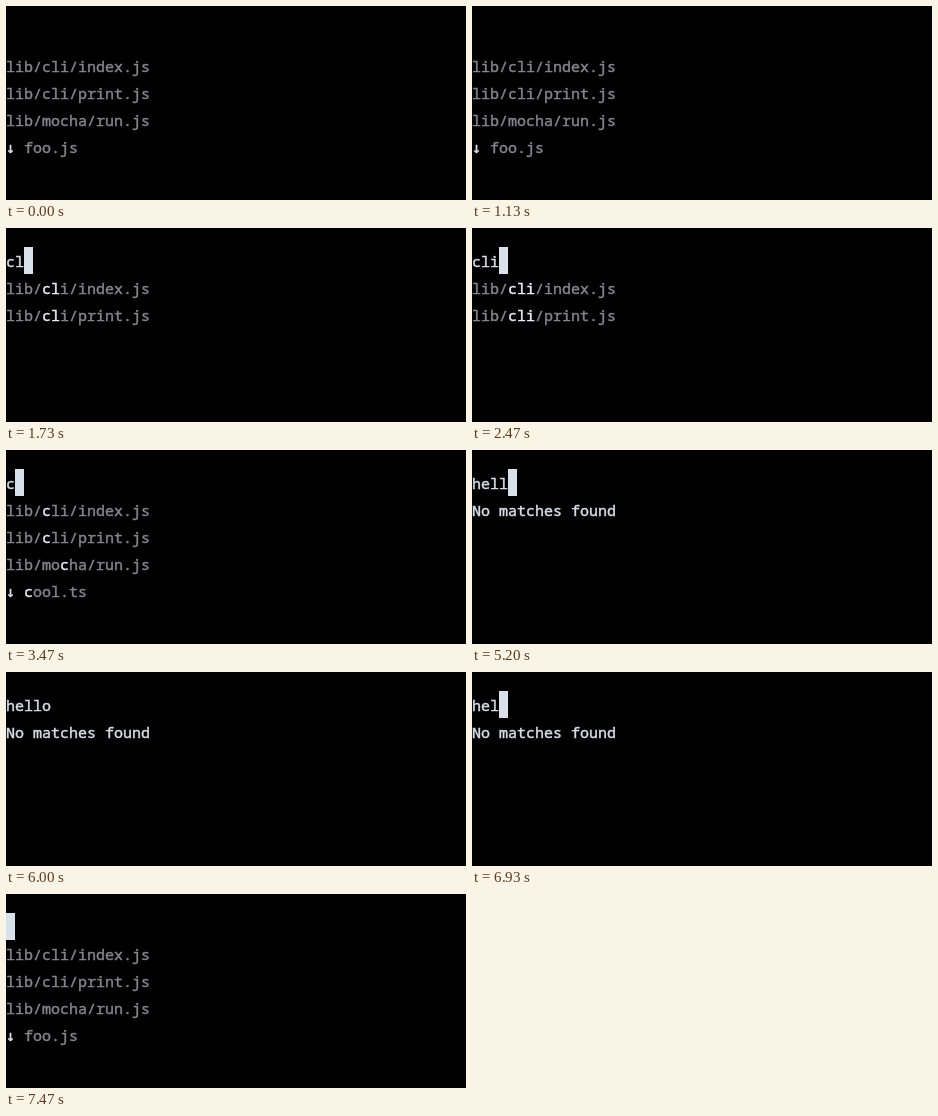
An HTML page that plays this animation: 460 by 194 pixels, repeating every 8000 ms.

```html
<!DOCTYPE html>
<html lang="en">
<head>
<meta charset="utf-8">
<style>
html, body { margin: 0; width: 100%; height: 100%; overflow: hidden; background: #000; }
#term {
  position: absolute; left: 0; top: 20px; width: 460px; height: 174px;
  font: 15px/27px "Noto Sans Mono", "DejaVu Sans Mono", monospace;
  -webkit-text-stroke: 0.45px; color: #d8dee9; white-space: pre;
}
#term div { position: relative; height: 27px; }
.dim { color: #85858a; }
.hit { color: #eceff4; }
.arrow { font-family: "DejaVu Sans Mono", monospace; line-height: 1; }
#cursor { position: absolute; top: -1px; width: 9px; height: 27px; background: #d8e0ea; }
</style>
</head>
<body>
<div id="term"></div>
<script>
const LOOP = 8000, CELL = 9;
const files = ["lib/cli/index.js", "lib/cli/print.js", "lib/mocha/run.js", "foo.js", "cool.ts"];

// [time, query, cursor visible]
const steps = [
  [0, "", 0], [530, "", 1], [1130, "", 0], [1470, "", 1],
  [1530, "c", 1], [1730, "cl", 1], [2470, "cli", 1], [2670, "cli", 0], [3270, "cli", 1],
  [3470, "c", 1], [4000, "", 1], [4200, "", 0],
  [4670, "h", 1], [4870, "he", 1], [5070, "hel", 1], [5200, "hell", 1],
  [5400, "hello", 1], [6000, "hello", 0], [6600, "hello", 1],
  [6730, "hell", 1], [6930, "hel", 1], [7130, "he", 1], [7330, "h", 1], [7470, "", 1]
];

const term = document.getElementById("term");
const row = html => `<div>${html}</div>`;
const more = '<span class="arrow">↓</span> ';

function mark(name, query) {
  const i = name.indexOf(query), end = i + query.length;
  const hit = query && `<span class="hit">${query}</span>`;
  return `<span class="dim">${name.slice(0, i)}${hit}${name.slice(end)}</span>`;
}

function results(query) {
  const found = files.filter(f => f.includes(query));
  if (!found.length) return row("No matches found");
  return found.slice(0, 4)
    .map((f, i) => row((i === 3 ? more : "") + mark(f, query)))
    .join("");
}

function render([, query, on]) {
  const cursor = on ? `<span id="cursor" style="left:${query.length * CELL}px"></span>` : "";
  term.innerHTML = row(query + cursor) + results(query);
}

let shown = null;
const start = performance.now();

function tick(now) {
  const t = Math.max(0, now - start) % LOOP;
  const step = steps.findLast(s => s[0] <= t);
  if (step !== shown) render(shown = step);
  requestAnimationFrame(tick);
}
tick(start);
</script>
</body>
</html>
```
